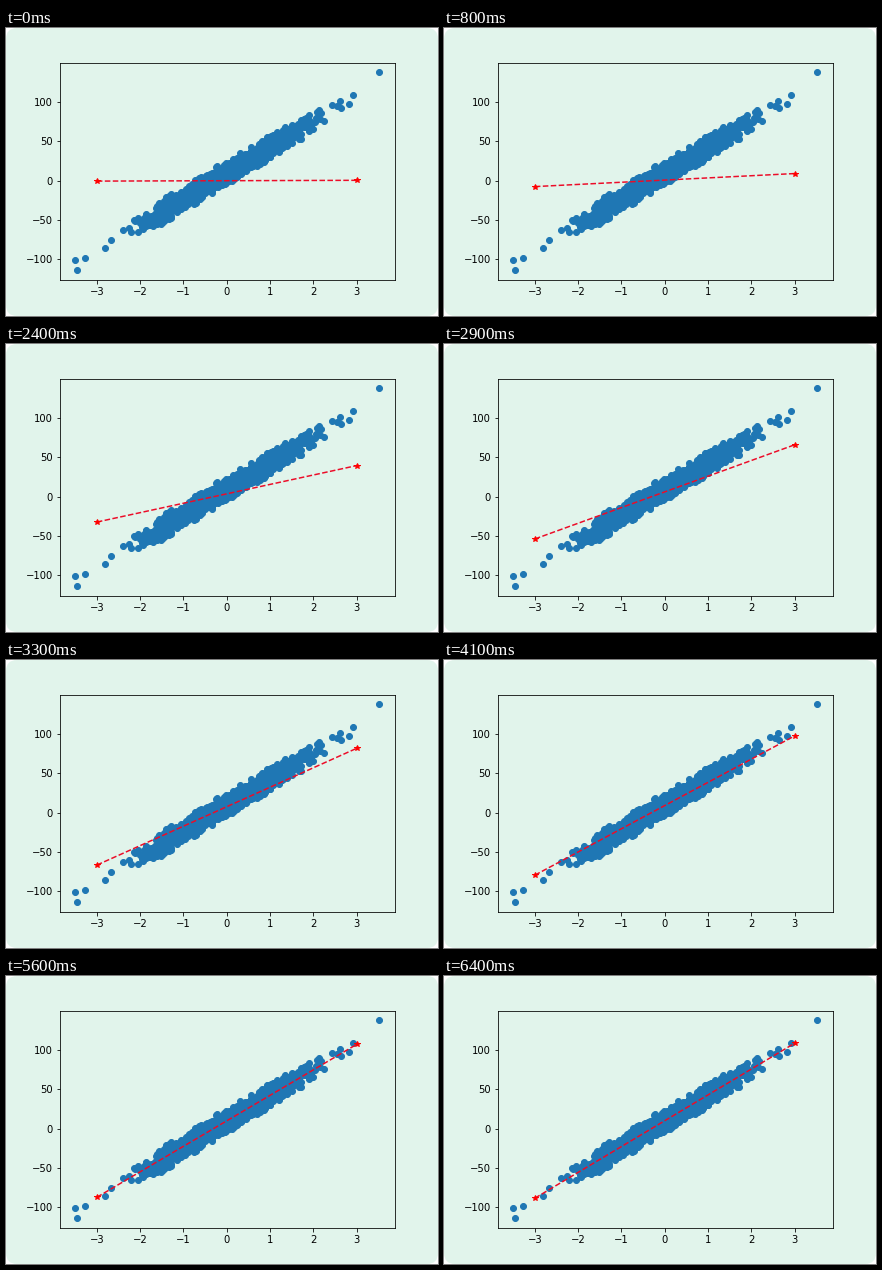
A matplotlib script for the animation above (6.5 s loop, 432 by 288 pixels).

```python
import numpy as np
import matplotlib.pyplot as plt
from matplotlib.animation import FuncAnimation
from matplotlib.patches import FancyBboxPatch

W, H, DPI = 432, 288, 72
FRAMES, STEP = 65, 100
SLOPE, BIAS = 33.2, 10.3
X_LIM, Y_LIM = (-3.8518, 3.8837), (-126.37, 150.48)

plt.rcParams["font.family"] = "DejaVu Sans"

# The few points that stand apart at both ends of the cloud
TAILS = [
    (-3.5, -101), (-3.46, -114), (-3.27, -98), (-2.81, -86),
    (-2.68, -75), (-2.4, -63), (2.43, 97), (2.55, 95), (2.61, 102),
    (2.65, 92), (2.82, 98), (2.92, 109), (3.53, 138.5),
]


def fit(x):
    return SLOPE * x + BIAS


def make_cloud(n=1000, reach=2.25, spread=15.5):
    rng = np.random.RandomState(7)
    x, noise = rng.randn(n), rng.randn(n) * 7.2
    keep = (np.abs(x) < reach) & (np.abs(noise) < spread)
    return np.column_stack([x, fit(x) + noise])[keep]


def progress(i):
    """Share of the fit learned: exponential decay, slow at first."""
    decay = np.interp(i, [0, 8, 25, 33, 64], [0.005, 0.087, 0.47, 1.37, 4.6])
    return 1 - np.exp(-decay)


fig = plt.figure(figsize=(W / DPI, H / DPI), dpi=DPI, facecolor="white")
fig.add_artist(FancyBboxPatch(
    (0, 0), W, H, boxstyle="round,pad=0,rounding_size=11",
    transform=None, facecolor="#e1f4eb", edgecolor="none", zorder=-1))

ax = fig.add_axes([0.125, 0.125, 0.775, 0.755], facecolor="none")
ax.set(xlim=X_LIM, ylim=Y_LIM,
       xticks=range(-3, 4), yticks=range(-100, 101, 50))
ax.scatter(*np.vstack([make_cloud(), TAILS]).T, color="#1f77b4")

ends = np.array([-3, 3])
line, = ax.plot(ends, ends * 0, "--*", color="#ec0c28", linewidth=1.5,
                markersize=6, markerfacecolor="red", markeredgecolor="red")


def draw(i):
    line.set_ydata(progress(i) * fit(ends))
    return line,


anim = FuncAnimation(fig, draw, frames=FRAMES, interval=STEP,
                     init_func=lambda: draw(0), repeat=True, repeat_delay=0)
plt.show()
```
